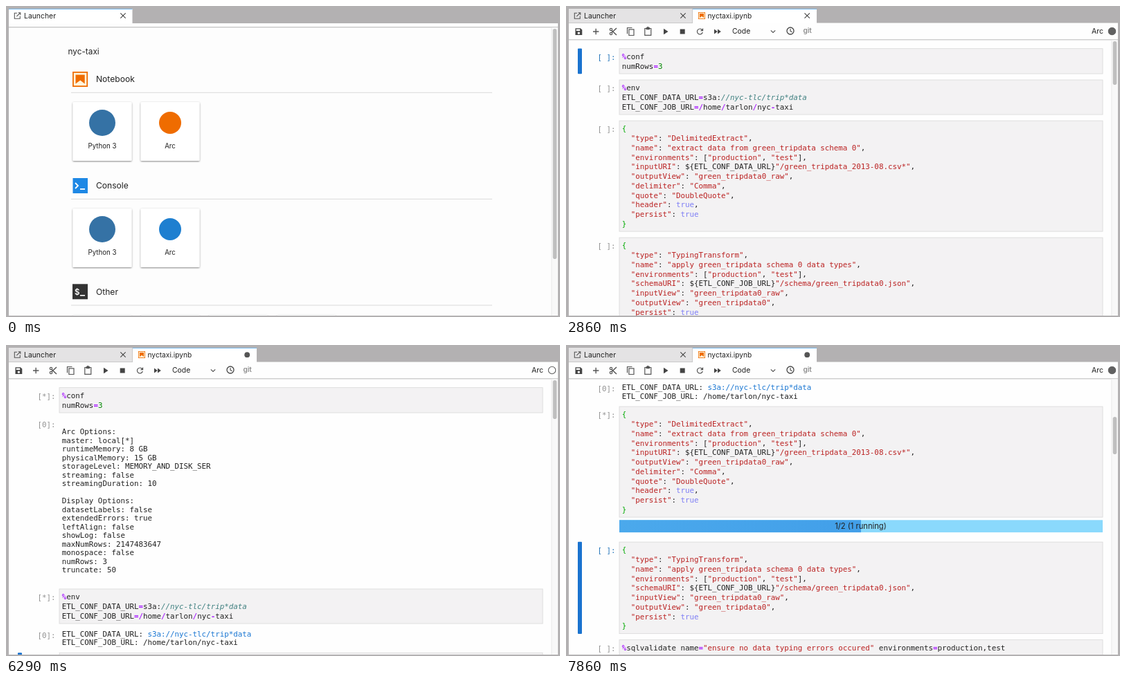
Recreate the animation shown at these times as an HTML page. Size 800 by 450 pixels, loop 8 s.

```html
<!DOCTYPE html>
<html lang="en">
<head>
<meta charset="utf-8">
<title>Notebook session</title>
<style>
html, body { margin: 0; width: 100%; height: 100%; overflow: hidden; background: #b3b1b2; }
svg { display: block; width: 800px; height: 450px; }
text { white-space: pre; font-family: Inter, Roboto, sans-serif; fill: #212121; }
.mono { font-family: "DejaVu Sans Mono", monospace; font-size: 10.82px; }
.b { fill: #0a0; }
.c { fill: #408080; font-style: italic; }
.s { fill: #ba2121; }
.a { fill: #7d7df5; }
.n { fill: #080; }
.o { fill: #a2f; font-weight: bold; }
.link { fill: #1976d2; }
</style>
</head>
<body>
<svg id="stage" viewBox="0 0 800 450"></svg>
<script>
const LOOP = 8000;
const ORANGE = '#ef6c00', BLUE = '#1e88e5', INK = '#555';
const LINE = 13.75, OUT_LINE = 12.5;

const CODE = [
`%conf
numRows=3`,
`%env
ETL_CONF_DATA_URL=s3a://nyc-tlc/trip*data
ETL_CONF_JOB_URL=/home/tarlon/nyc-taxi`,
`{
  "type": "DelimitedExtract",
  "name": "extract data from green_tripdata schema 0",
  "environments": ["production", "test"],
  "inputURI": \${ETL_CONF_DATA_URL}"/green_tripdata_2013-08.csv*",
  "outputView": "green_tripdata0_raw",
  "delimiter": "Comma",
  "quote": "DoubleQuote",
  "header": true,
  "persist": true
}`,
`{
  "type": "TypingTransform",
  "name": "apply green_tripdata schema 0 data types",
  "environments": ["production", "test"],
  "schemaURI": \${ETL_CONF_JOB_URL}"/schema/green_tripdata0.json",
  "inputView": "green_tripdata0_raw",
  "outputView": "green_tripdata0",
  "persist": true
}`,
`%sqlvalidate name="ensure no data typing errors occured" environments=production,test
SELECT
`
].map(s => s.split('\n'));

const OUTPUT = [
`
Arc Options:
master: local[*]
runtimeMemory: 8 GB
physicalMemory: 15 GB
storageLevel: MEMORY_AND_DISK_SER
streaming: false
streamingDuration: 10

Display Options:
datasetLabels: false
extendedErrors: true
leftAlign: false
showLog: false
maxNumRows: 2147483647
monospace: false
numRows: 3
truncate: 50
`,
`ETL_CONF_DATA_URL: s3a://nyc-tlc/trip*data
ETL_CONF_JOB_URL: /home/tarlon/nyc-taxi`
].map(s => s.split('\n'));

// active: selected cell; run: cells started; out: text outputs shown
const STATES = [
  { at: 0, launcher: true },
  { at: 2140, active: 0, run: 0, out: 0, busy: true, thumb: [51, 63] },
  { at: 3290, active: 1, run: 1, out: 0, busy: true, thumb: [51, 63] },
  { at: 4710, active: 1, run: 1, out: 1, busy: false, thumb: [51, 57] },
  { at: 5290, active: 2, run: 2, out: 2, busy: false, thumb: [51, 56] },
  { at: 6570, active: 3, run: 3, out: 2, busy: true, thumb: [104, 54], scroll: 356.5,
    done: 0, label: '0/1 (1 running)' },
  { at: 7430, active: 3, run: 3, out: 2, busy: true, thumb: [104, 54], scroll: 356.5,
    done: 0.5, label: '1/2 (1 running)' }
];

const rect = (x, y, w, h, fill, more = '') =>
  `<rect x="${x}" y="${y}" width="${w}" height="${h}" fill="${fill}" ${more}/>`;
const disc = (x, y, r, fill, more = '') =>
  `<circle cx="${x}" cy="${y}" r="${r}" fill="${fill}" ${more}/>`;
const text = (x, y, s, size, more = '') =>
  `<text x="${x}" y="${y}" font-size="${size}" ${more}>${s}</text>`;
const mono = (x, y, s, more = '') => `<text class="mono" x="${x}" y="${y}" ${more}>${s}</text>`;
const stroke = (d, color = INK, w = 1.2) =>
  `<path d="${d}" fill="none" stroke="${color}" stroke-width="${w}"/>`;
const fill = (d, color = INK) => `<path d="${d}" fill="${color}" fill-rule="evenodd"/>`;

const TOKENS = /(?<b>^[{}]$)|(?<c>\/\/.*)|(?<s>"[^"]*")|(?<a>\btrue\b)|(?<n>\b\d+\b)|(?<o>[%=\/-])/g;
function highlight(line) {
  return line.replace(TOKENS, (m, ...rest) => {
    const groups = rest[rest.length - 1];
    const kind = Object.keys(groups).find(k => groups[k] !== undefined);
    return `<tspan class="${kind}">${m}</tspan>`;
  });
}

const bookmark = (x, y, k) =>
  `<g transform="translate(${x} ${y}) scale(${k})">` +
  rect(1.8, 1.8, 18.4, 18.4, ORANGE) + rect(3.3, 3.3, 15.4, 15.4, '#fff4dc') +
  fill('M16.5 16.5l-5.4-4.3-5.6 4.3v-11h11z', ORANGE) + '</g>';

const cross = x => stroke(`M${x - 3.7} 10.3l7.4 7.4m0 -7.4l-7.4 7.4`, '#444', 1.1);

function launcherTab(active) {
  return rect(4, 4, 178.5, 21, active ? '#fff' : '#e4e3e4') +
    (active ? rect(4, 4, 178.5, 1, '#7dbdf0') : '') +
    stroke('M16 10.2H12.3V18.2H20.3V14.5M17.6 9.7H20.8V12.9M20.6 9.9L15.3 15.2', INK, 1.1) +
    text(26, 18, 'Launcher', 10.4) + cross(169);
}

function card(x, y, label, color, r) {
  return rect(x, y, 85, 85, '#fff', 'rx="1.5" filter="url(#shadow)"') +
    (label ? disc(x + 42.5, y + 30, r, color) +
      text(x + 42.5, y + 66.5, label, 9.7, 'text-anchor="middle"') : '');
}

function section(y, title, icon) {
  return icon + text(130, y + 4.4, title, 12.1) + rect(94, y + 18.8, 608, 1, '#dadada');
}

function launcher() {
  const consoleIcon = rect(96.5, 249, 21.5, 22, BLUE) +
    stroke('M100 256l4 4l-4 4', '#fff', 1.8) + rect(107, 264, 7, 1.8, '#fff');
  const otherIcon = rect(96, 402.3, 22, 22, '#333') +
    text(99, 417.5, '$', 11.5, 'style="fill:#fff" font-weight="600"') + rect(107, 418, 7, 1.6, '#fff');
  return rect(4, 25, 793, 423, '#fdfdfd') + launcherTab(true) +
    rect(4, 30, 793, 1.3, '#c4c4c4') +
    rect(787.5, 31, 9.5, 417, '#f8f8f8') + rect(787.5, 31, 0.8, 417, '#e6e6e6') +
    rect(789.7, 33, 5.6, 333, '#bfbfbf', 'rx="2.8"') +
    text(89.5, 70.3, 'nyc-taxi', 11.8) +
    '<g clip-path="url(#body)">' +
    section(106, 'Notebook', bookmark(93.9, 92.8, 1.2)) +
    section(260, 'Console', consoleIcon) + section(413.7, 'Other', otherIcon) +
    [[139, ORANGE], [293, '#1e7fd0']].map(([y, color]) =>
      card(96.5, y, 'Python 3', '#3572a5', 19) + card(194.5, y, 'Arc', color, 16)).join('') +
    [0, 1, 2, 3].map(i => card(96.5 + 98.2 * i, 447, '')).join('') + '</g>';
}

function toolbar(busy) {
  const save = fill('M13.5 32.3h7.5l2.3 2.3v7.4h-9.8zM14.8 33.4v2.7h5.4v-2.7zM18.4 37.4a1.7 1.7 0 1 0 .01 0z', '#444');
  const plus = stroke('M39 37h8.4M43.2 32.8v8.4', INK, 1.4);
  const cut = stroke('M65.8 35.3L73 42M65.8 38.8L73 32', INK, 1.5) +
    [34, 40].map(y => disc(65, y, 1.7, 'none', `stroke="${INK}" stroke-width="1.2"`)).join('');
  const copy = stroke('M88.5 40.2V31.5H95.5M90.9 33.9H98V42.5H90.9z');
  const paste = stroke('M113.8 32.5H122.8V42.3H113.8z') + rect(115.6, 31, 5.4, 3.2, INK) + disc(118.3, 31, 1.2, INK);
  const run = fill('M141 32.7v8.6l6.5-4.3z', '#444');
  const stop = rect(164.7, 33.5, 7, 7, '#444');
  const reload = stroke('M196.7 34.7A4 4 0 1 0 197.3 38') + fill('M198.1 32v4.2h-4.2z');
  const forward = fill('M214 33.5v7l4.8-3.5zM219 33.5v7l4.8-3.5z', '#444');
  const clock = disc(324, 36, 5, 'none', 'stroke="#444" stroke-width="1.3"') + stroke('M324 33v3.3l2.5 1.5', '#444', 1.1);
  return save + plus + cut + copy + paste + run + stop + reload + forward +
    text(240, 40.4, 'Code', 10.4) + stroke('M295.8 35.3l3.2 3.2l3.2 -3.2') + clock +
    text(342.5, 39.3, 'git', 10, 'style="fill:#8c8c8c" font-weight="600"') +
    text(759, 40.4, 'Arc', 10.5) +
    disc(788.5, 36.5, 5.2, busy ? '#616161' : '#fff', 'stroke="#616161" stroke-width="1.1"');
}

const prompt = (y, mark, color) => mono(45.5, y, `[${mark}]:`, `style="fill:${color}"`);

function progress(y, done, label) {
  return rect(77, y, 698, 17.8, '#8ad9fc') +
    (done ? rect(77, y, 698 * done, 17.8, 'url(#done)') : '') +
    text(425.5, y + 13, label, 11.2, 'text-anchor="middle"');
}

function cells(state) {
  let top = 61.7 - (state.scroll || 0), svg = '';
  CODE.forEach((lines, i) => {
    const height = lines.length * LINE + 8.8, active = i === state.active;
    if (active) svg += rect(17, top - 0.3, 6, height + 0.6, '#1a73cf', 'rx="1"');
    svg += prompt(top + 16, i < state.run ? '*' : ' ', active ? '#1f72b8' : '#909090') +
      rect(77, top, 698, height, '#f3f2f3', 'stroke="#d8d8d8" stroke-width="0.8"') +
      lines.map((s, k) => mono(80.8, top + 15.3 + k * LINE, highlight(s))).join('');
    top += height;
    if (i < state.out) {
      const out = OUTPUT[i];
      svg += prompt(top + 20.7, 0, '#909090') +
        out.map((s, k) => mono(80.8, top + 18.7 + k * OUT_LINE,
          s.replace(/s3a:.*/, '<tspan class="link">$&</tspan>'))).join('');
      top += out.length * OUT_LINE + 17.5;
    } else if (i === 2 && state.label) {
      svg += progress(top + 4.2, state.done, state.label);
      top += 36;
    } else top += 9;
  });
  return svg;
}

function notebook(state) {
  return rect(4, 24.5, 793, 423.5, '#fefefe') + launcherTab(false) +
    rect(183, 4, 179, 21, '#fff') + rect(183, 4, 179, 1, '#7dbdf0') + rect(4, 24, 179, 0.8, '#c4c4c4') +
    bookmark(190, 8, 0.546) + text(204.5, 18, 'nyctaxi.ipynb', 10.2) +
    (state.run ? disc(348.2, 14.2, 3.9, '#555') : cross(348.2)) +
    toolbar(state.busy) + rect(4, 48.2, 793, 1.2, '#c4c4c4') +
    '<g clip-path="url(#page)">' + cells(state) + '</g>' +
    rect(787.5, 49.4, 9.5, 398.6, '#f8f8f8') + rect(787.5, 49.4, 0.8, 398.6, '#e6e6e6') +
    rect(789.7, state.thumb[0], 5.6, state.thumb[1], '#bfbfbf', 'rx="2.8"');
}

const DEFS = `<defs>
  <clipPath id="body"><rect x="4" y="31" width="783" height="417"/></clipPath>
  <clipPath id="page"><rect x="4" y="49.4" width="783" height="398.6"/></clipPath>
  <linearGradient id="done"><stop stop-color="#4ba9ec"/><stop offset="1" stop-color="#429fe9"/></linearGradient>
  <filter id="shadow" x="-10%" y="-10%" width="120%" height="120%">
    <feDropShadow dx="0" dy="0.9" stdDeviation="1.1" flood-color="#000" flood-opacity="0.5"/>
  </filter>
</defs>`;

const stage = document.getElementById('stage');
let shown = null;

function render(time) {
  const t = time % LOOP;
  const state = STATES.filter(s => s.at <= t).pop();
  if (state !== shown) {
    shown = state;
    stage.innerHTML = DEFS + rect(0, 0, 800, 450, '#b3b1b2') +
      (state.launcher ? launcher() : notebook(state));
  }
}

const start = performance.now();
function tick() {
  render(performance.now() - start);
  requestAnimationFrame(tick);
}
tick();
</script>
</body>
</html>
```
